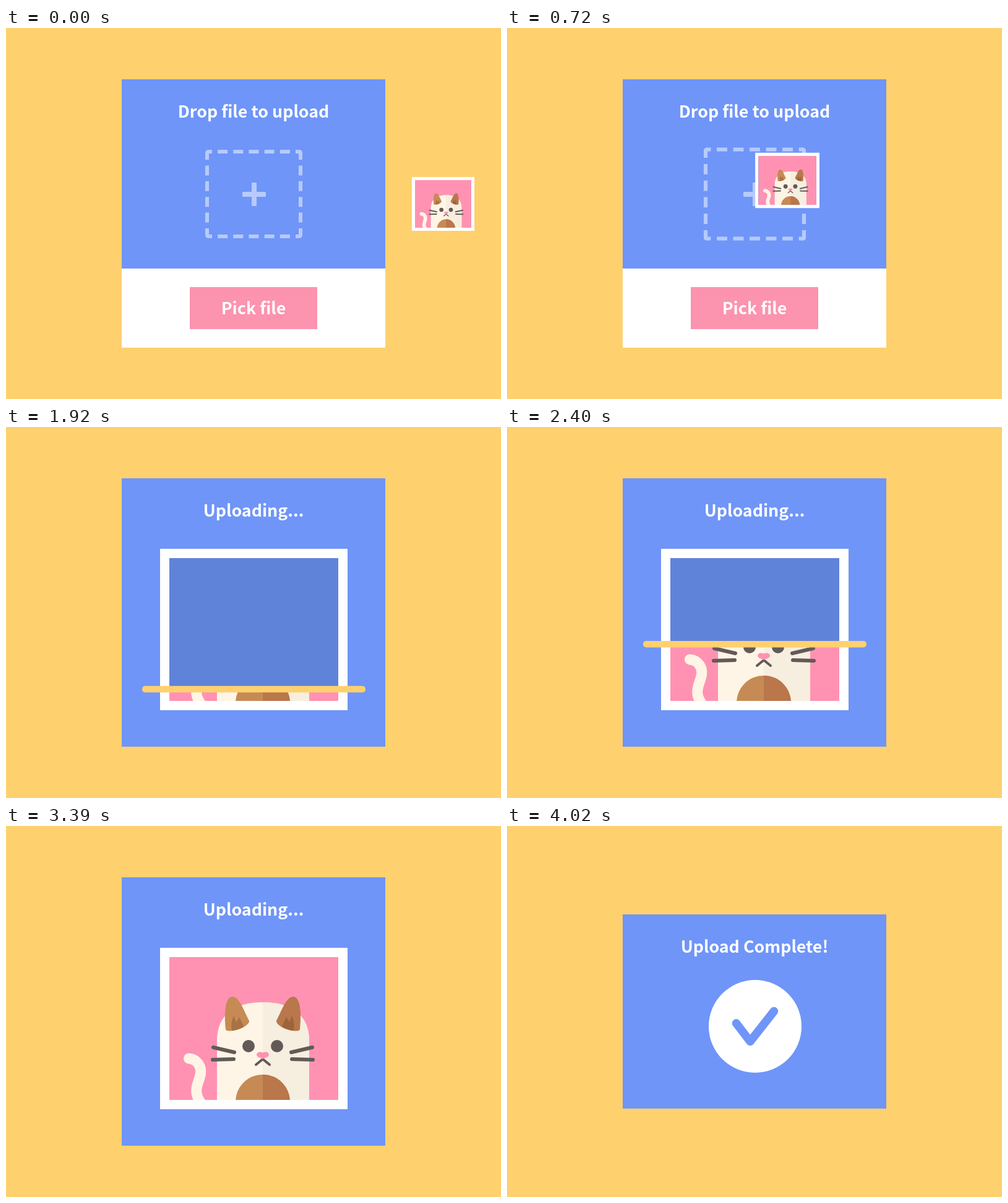
Animation of 800 by 600 pixels, one loop 5400 ms. Source, as an HTML page:

```html
<!DOCTYPE html>
<html lang="en">
<head>
<meta charset="utf-8">
<title>Upload</title>
<style>
  html, body { margin: 0; width: 100%; height: 100%; overflow: hidden; background: #ffd06e; }
  svg { display: block; width: 800px; height: 600px; }
  text {
    font: 600 26.8px "Noto Sans CJK JP", "Noto Sans CJK SC", "Noto Sans CJK", "Open Sans", sans-serif;
    fill: #fff; text-anchor: middle;
  }
  .line { fill: none; stroke-linecap: round; stroke-linejoin: round; }
</style>
</head>
<body>
<svg viewBox="0 0 800 600">
  <defs>
    <clipPath id="corners"><rect x="322" y="197" width="157" height="143" rx="5"/></clipPath>
    <clipPath id="reveal"><rect id="window" x="264" y="212" width="273" height="231"/></clipPath>
    <clipPath id="rightHalf"><rect x="415" y="212" width="122" height="231"/></clipPath>
    <path id="body" d="M341 443V347C341 305 370 285 415 285S490 305 490 347V443Z"/>
    <circle id="belly" cx="415" cy="446" r="44"/>
    <path id="ear" d="M355 329C352 300 355 277 365 276C377 275 384 298 393 315C394 322 376 331 362 331.5Q355.5 331.5 355 329Z"/>
    <path id="innerEar" d="M365 331C363 322 365 313 368 307L372 317L377 309C379 314 383 319 384 325Q376 330 365 331Z"/>
    <g id="face">
      <circle cx="392" cy="356" r="10" fill="#635a57"/>
      <path class="line" stroke="#635a57" stroke-width="6" d="M335 358L369 366M334 378L368 377"/>
    </g>
  </defs>

  <g id="card">
    <rect x="187" y="83" width="426" height="434" fill="#fff"/>
    <rect x="297" y="419" width="206" height="68" fill="#fc93af"/>
    <text x="400" y="463">Pick file</text>
  </g>
  <rect id="panel" x="187" width="426" fill="#6f95f8"/>

  <g id="zone">
    <g id="box">
      <rect id="shade" x="328" y="203" width="145" height="131" fill="#6284db"/>
      <g clip-path="url(#corners)" opacity=".5" fill="none" stroke="#fff" stroke-width="6">
        <path d="M325 200H476M325 337H476" stroke-dasharray="16 9.167" stroke-dashoffset="8"/>
        <path d="M325 197V340M476 197V340" stroke-dasharray="16 9.4"/>
      </g>
    </g>
    <path d="M383 250m14 1q0-1 1-1h6q1 0 1 1v14h14q1 0 1 1v6q0 1-1 1h-14v14q0 1-1 1h-6q-1 0-1-1v-14h-14q-1 0-1-1v-6q0-1 1-1h14Z" fill="#fff" opacity=".5"/>
  </g>

  <g id="content">
    <text id="ask" x="400" y="145">Drop file to upload</text>
    <text id="busy" x="400" y="145">Uploading...</text>
    <text id="done" x="400" y="145">Upload Complete!</text>
    <g id="photo">
      <rect x="249" y="197" width="303" height="261" fill="#fff"/>
      <rect x="264" y="212" width="273" height="231" fill="#6083da"/>
      <g id="picture" clip-path="url(#reveal)">
        <rect x="264" y="212" width="273" height="231" fill="#ff92b2"/>
        <path class="line" stroke="#fff5e6" stroke-width="17" d="M295.5 376C309 377 316 389 314.5 400C313 412 306 420 308 432C308.6 438 311 442 315 448"/>
        <use href="#body" fill="#fff5e6"/>
        <use href="#body" fill="#f6eedf" clip-path="url(#rightHalf)"/>
        <use href="#belly" fill="#c68b54"/>
        <use href="#belly" fill="#b9774b" clip-path="url(#rightHalf)"/>
        <use href="#ear" fill="#c68b54"/>
        <use href="#innerEar" fill="#aa7146"/>
        <use href="#face"/>
        <g transform="matrix(-1 0 0 1 830 0)">
          <use href="#ear" fill="#b9774b"/>
          <use href="#innerEar" fill="#9d643c"/>
          <use href="#face"/>
        </g>
        <path class="line" stroke="#635a57" stroke-width="4" d="M404 386L415 377L426 386"/>
        <path fill="#ff92b2" d="M405 370C405 366 410 364 415 366.5C420 364 425 366 425 370C424 375 419 374 415 377C411 374 406 375 405 370Z"/>
      </g>
    </g>
    <g id="badge">
      <circle cx="401" cy="264" r="75" fill="#fff"/>
      <path class="line" stroke="#6f95f8" stroke-width="13.5" d="M370.5 259L393 288.5L431.5 239.5"/>
    </g>
  </g>
  <rect id="bar" x="220" width="361" height="10.6" rx="5" fill="#ffd06e"/>
</svg>

<script>
const LOOP = 5400;
const el = id => document.getElementById(id);
const set = (id, name, value) => el(id).setAttribute(name, value);
const fade = (id, value) => set(id, 'opacity', value);

const span = (t, from, to) => Math.min(1, Math.max(0, (t - from) / (to - from)));
const mix = (a, b, p) => a + (b - a) * p;
const inOut = p => p < .5 ? 2 * p * p : 1 - 2 * (1 - p) ** 2;
const backOut = (p, s) => 1 + (s + 1) * (p - 1) ** 3 + s * (p - 1) ** 2;

// Scale around (ox, oy), which lands on (x, y)
const place = (id, ox, oy, x, y, k) =>
  set(id, 'transform', `translate(${x} ${y}) scale(${k}) translate(${-ox} ${-oy})`);

function draw(t) {
  // Drag along an arc, then drop
  const drag = inOut(span(t, 0, 1020));
  const arc = 4 * drag * (1 - drag);
  const grow = inOut(span(t, 1500, 1800));
  const leave = inOut(span(t, 3690, 3870));
  const x = mix(706.5, 400.5, drag);
  const y = mix(mix(284.5, 268.5, drag) - 43.5 * arc, 327.5, grow);
  const size = mix((1 + .05 * arc) / 3, 1, grow) * (1 - leave);
  place('photo', 400.5, 327.5, x, mix(y, 264, leave), size);

  place('box', 400.5, 268.5, 400.5, 268.5, mix(1, 1.14, inOut(span(t, 590, 890))));
  fade('shade', span(t, 840, 1020));
  fade('zone', 1 - span(t, 1500, 1650));

  // Panel covers the button, later shrinks around the result
  const cover = backOut(span(t, 1500, 1890), 1.35);
  const shrink = inOut(span(t, 3690, 4020));
  const top = mix(83, 143, shrink);
  set('panel', 'y', top);
  set('panel', 'height', mix(mix(306, 434, cover), 314, shrink ** 1.85));
  set('content', 'transform', `translate(0 ${top - 83})`);
  fade('card', t < 1890 ? 1 : 0);

  const asked = span(t, 1500, 1680), sent = span(t, 3690, 3840);
  fade('ask', 1 - asked);
  fade('busy', asked * (1 - sent));
  fade('done', sent);

  // Scan upwards
  const scan = mix(442.4, 214.8, span(t, 1800, 3300));
  const edge = t < 1800 || t >= 3300 ? 212 : scan;
  set('bar', 'y', scan - 5.3);
  fade('bar', span(t, 1740, 1800) * (1 - span(t, 3300, 3390)));
  set('window', 'y', edge);
  set('window', 'height', 443 - edge);
  fade('picture', t < 1800 ? 1 - span(t, 1500, 1740) : 1);

  place('badge', 401, 264, 401, 264, t < 3750 ? 0 : backOut(span(t, 3750, 4020), 1.4));
}

const start = performance.now();
function tick() {
  draw((performance.now() - start) % LOOP);
  requestAnimationFrame(tick);
}
tick();
</script>
</body>
</html>
```
